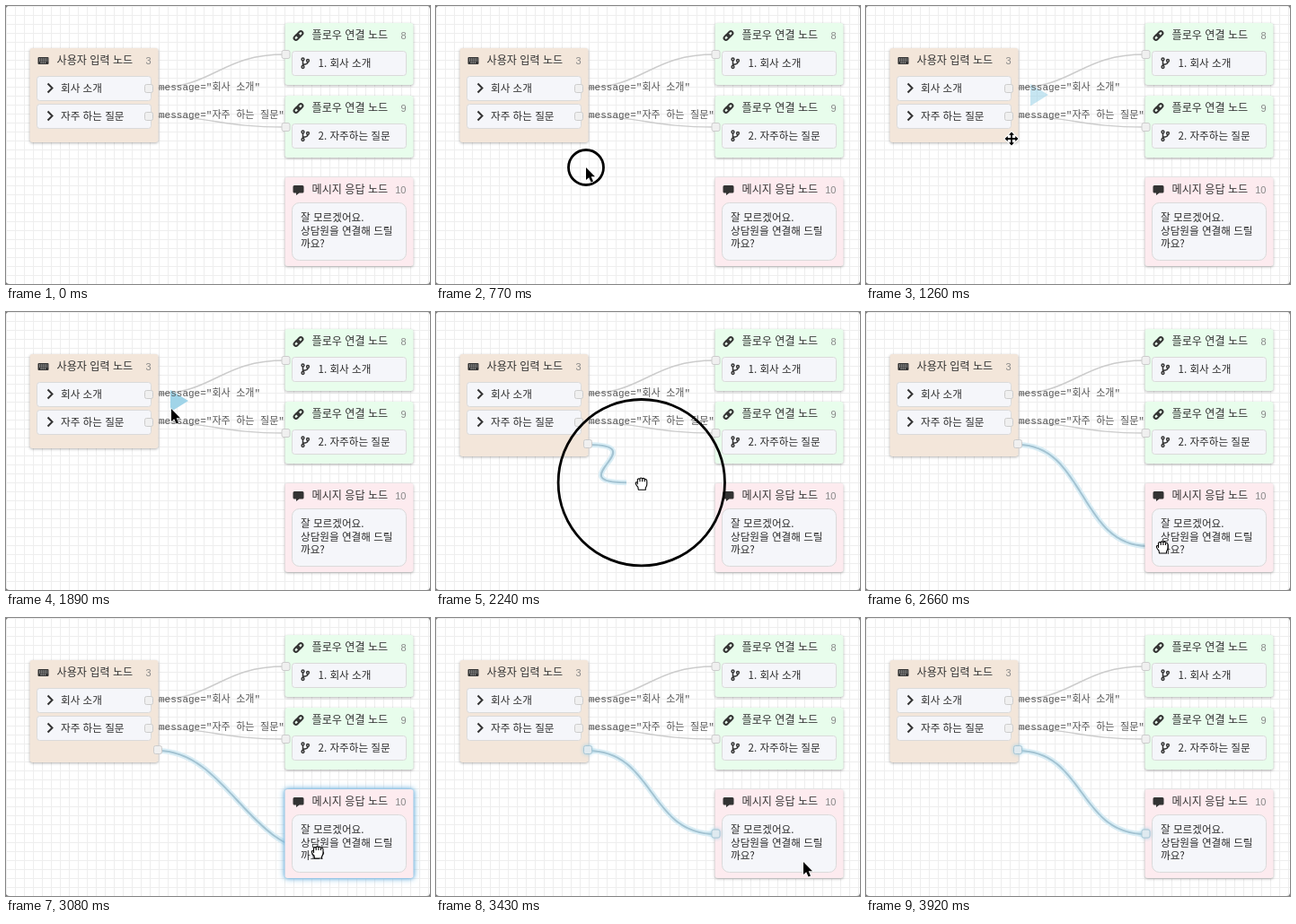
Recreate the animation shown at these times as an HTML page. Size 472 px wide and 310 px high, loop 5320 ms.

```html
<!DOCTYPE html>
<html lang="ko">
<head>
<meta charset="utf-8">
<style>
  html, body { margin: 0; width: 100%; height: 100%; overflow: hidden; background: #777; }
  svg { display: block; width: 472px; height: 310px; }
  text { font-family: "Noto Sans CJK KR", "Noto Sans CJK", sans-serif; font-size: 11.6px; fill: #2b2b2b; }
  .title { font-size: 12.1px; fill: #333; }
  .count { font: 11px "Liberation Sans", sans-serif; fill: #888; text-anchor: end; }
  .label { font: 11px "Liberation Mono", "Noto Sans CJK KR", "Noto Sans CJK", monospace; fill: #555; }
  .node { filter: drop-shadow(0 1px 1.5px rgba(0, 0, 0, .3)); }
  .node.over { filter: drop-shadow(0 0 2px #6db0dc) drop-shadow(0 0 3px #8cc4e6); }
  .item { fill: #f5f6fa; stroke: #dadada; }
  .wire { fill: none; stroke: #ccc; stroke-width: 1.5; }
  .halo { stroke: #d9edf5; stroke-width: 6; }
  .live { stroke: #a3c3d2; stroke-width: 2; }
  .port { fill: #f0f0f0; stroke: #ccc; }
  .port.lit { fill: #dfeaf0; stroke: #a9c6d4; filter: drop-shadow(0 0 2px #9fd0e6); }
  .line { fill: none; stroke: #333; stroke-width: 2; }
</style>
</head>
<body>
<svg viewBox="0 0 472 310">
  <defs>
    <pattern id="grid" width="10" height="10" patternUnits="userSpaceOnUse">
      <path d="M.5 0V10M0 .5H10" stroke="#eee"/>
    </pattern>
    <g id="keyboard">
      <rect x="-6" y="-4" width="12" height="8" rx="1" fill="#333"/>
      <path d="M-4.5-2H5M-4.5 0H5M-3 2.2H3" stroke="#ddd" stroke-dasharray="1.2 1"/>
    </g>
    <g id="link" class="line" transform="rotate(-45)">
      <rect x="-6" y="-2.2" width="7" height="4.4" rx="2.2"/>
      <rect x="-1" y="-2.2" width="7" height="4.4" rx="2.2"/>
    </g>
    <path id="comment" d="M-4.5-5H4.5Q6-5 6-3.5V2Q6 3.5 4.5 3.5H1L-2.5 6V3.5H-4.5Q-6 3.5-6 2V-3.5Q-6-5-4.5-5Z" fill="#333"/>
    <path id="chevron" class="line" d="M-2.5-5L2.5 0L-2.5 5"/>
    <g id="branch" class="line" style="stroke-width:1.5">
      <circle cx="-2.5" cy="-4" r="1.4"/><circle cx="3" cy="-2.5" r="1.4"/><circle cx="-2.5" cy="4.5" r="1.4"/>
      <path d="M-2.5-2.5V3M3-1Q3 1.5-2.5 1.8"/>
    </g>
    <path id="arrow" d="M0 0V14L3.2 11.2L5.6 16.5L8 15.4L5.7 10.3H10Z" stroke="#fff" stroke-width="1.2" paint-order="stroke"/>
    <path id="move" d="M0-7.5L3-4.2H1V-1H4.2V-3L7.5 0L4.2 3V1H1V4.2H3L0 7.5L-3 4.2H-1V1H-4.2V3L-7.5 0L-4.2-3V-1H-1V-4.2H-3Z"
      stroke="#fff" stroke-width="2" paint-order="stroke"/>
    <g id="hand" fill="#fff" stroke="#000" stroke-width="1.1" stroke-linejoin="round">
      <path d="M-3.5 8L-4 5Q-7 2-6.5 0Q-6-1-4.5 0V-3Q-4-5-2-4Q-1-6 .8-4.5Q2.5-5.5 3.5-3.8Q6-4 6 -1.5V2Q6 4 4.5 6V8Z"/>
      <path d="M-4.5 0V2M-1.8-4V-1M.9-4.5V-1M3.5-3.8V-1"/>
    </g>
  </defs>
  <rect width="472" height="310" rx="4" fill="#fff"/>
  <rect width="472" height="310" rx="4" fill="url(#grid)"/>
  <g id="wires"></g>
  <g id="nodes"></g>
  <path id="triangle" d="M183 87L203 99L183 111.5Z" fill="#a0d4e8"/>
  <text class="label" x="170" y="94">message="회사 소개"</text>
  <text class="label" x="170" y="125">message="자주 하는 질문"</text>
  <g id="ports"></g>
  <circle id="ring" fill="none" stroke="#000" stroke-width="2.8"/>
  <use id="cursor"/>
</svg>
<script>
const LOOP = 5320, STEP = 70;
const GRAB = 2030, DROP = 3150;
const $ = id => document.getElementById(id);

const wirePath = (x1, y1, x2, y2) => `M${x1} ${y1}C${x1 + 75} ${y1} ${x2 - 75} ${y2} ${x2} ${y2}`;
const wire = (cls, d = '') => `<path class="wire ${cls}" d="${d}"/>`;
const port = (x, y, id = '') => `<rect id="${id}" class="port" x="${x - 4.5}" y="${y - 4.5}" width="9" height="9" rx="2"/>`;
const icon = (name, x, y) => `<g transform="translate(${x} ${y})"><use href="#${name}"/></g>`;
const item = (x, y, name, label) =>
  `<rect class="item" x="${x + .5}" y="${y + .5}" width="127" height="27" rx="3"/>` +
  icon(name, x + 15, y + 13.5) + `<text x="${x + (name === 'chevron' ? 27 : 29.5)}" y="${y + 17.7}">${label}</text>`;
const node = (id, x, y, height, color, symbol, title, count, body) =>
  `<rect id="${id}" class="node" x="${x}" y="${y}" width="143" height="${height}" rx="3" fill="${color}"/>` +
  icon(symbol, x + 15, y + 14) +
  `<text class="title" x="${x + 30}" y="${y + 18}">${title}</text>` +
  `<text class="count" x="${x + 135}" y="${y + 18}">${count}</text>` + body;

$('wires').innerHTML =
  wire('', wirePath(159, 92, 311, 54)) + wire('', wirePath(159, 123, 311, 135)) + wire('halo') + wire('live');

const reply = ['잘 모르겠어요.', '상담원을 연결해 드릴', '까요?'];
$('nodes').innerHTML =
  node('input', 26.5, 47, 105, '#f3e6da', 'keyboard', '사용자 입력 노드', 3,
    item(34, 78, 'chevron', '회사 소개') + item(34, 109, 'chevron', '자주 하는 질문')) +
  node('flow1', 310.5, 19, 69, '#e8fdec', 'link', '플로우 연결 노드', 8, item(318, 50, 'branch', '1. 회사 소개')) +
  node('flow2', 310.5, 100, 69, '#e8fdec', 'link', '플로우 연결 노드', 9, item(318, 131, 'branch', '2. 자주하는 질문')) +
  node('reply', 310.5, 191, 99, '#fdebef', 'comment', '메시지 응답 노드', 10,
    '<rect class="item" x="318.5" y="219.5" width="127" height="64" rx="8"/>' +
    reply.map((line, i) => `<text x="328" y="${240 + i * 14.7}">${line}</text>`).join(''));

$('ports').innerHTML =
  port(159, 92) + port(159, 123) + port(311.5, 54) + port(311.5, 135) + port(169, 147, 'out') + port(311.5, 240.5, 'in');

const track = [
  [350, 161, 200], [490, 164, 186], [770, 167, 180], [840, 167, 180], [1190, 162, 148], [1470, 162, 148],
  [1890, 184, 108], [2030, 187, 116], [2170, 212, 172], [2520, 296, 263], [2730, 347, 260], [DROP, 347, 260],
  [3570, 440, 278], [3850, 468, 306]
];
function pointer(t) {
  const i = track.findIndex(p => p[0] > t);
  if (i < 0) return track.at(-1).slice(1);
  if (i === 0) return track[0].slice(1);
  const [t0, x0, y0] = track[i - 1], [t1, x1, y1] = track[i];
  const k = (t - t0) / (t1 - t0);
  return [x0 + (x1 - x0) * k, y0 + (y1 - y0) * k];
}

const show = (el, on) => el.setAttribute('visibility', on ? 'visible' : 'hidden');
const between = (t, a, b) => t >= a && t < b;
const liveWires = document.querySelectorAll('.halo, .live');

function ringRadius(t) {
  if (between(t, 350, 840)) return 19.5 + 16 * (770 - t) / STEP;
  if (between(t, 2170, 2660)) return 28.7 + 16 * (2520 - t) / STEP;
  return 0;
}

function draw(t) {
  const [x, y] = pointer(t);
  const grabbed = t >= GRAB, dropped = t >= DROP;

  $('input').setAttribute('height', grabbed ? 114 : 105);
  $('reply').classList.toggle('over', between(t, 2730, DROP));
  show($('out'), grabbed);
  show($('in'), dropped);
  for (const id of ['out', 'in']) $(id).classList.toggle('lit', dropped);

  show($('triangle'), between(t, 1120, GRAB));
  $('triangle').setAttribute('opacity', t < 1190 ? .3 : t < 1470 ? .6 : Math.min(1, .7 + (t - 1470) / 700));

  // The loose end trails the pointer by one step.
  const end = dropped ? [311, 241] : [pointer(t - STEP)[0], y];
  for (const path of liveWires) {
    show(path, grabbed);
    path.setAttribute('d', wirePath(169, 148, ...end));
  }

  const radius = ringRadius(t);
  show($('ring'), radius > 0);
  $('ring').setAttribute('r', radius);
  $('ring').setAttribute('cx', x);
  $('ring').setAttribute('cy', y);

  const overNode = x < 170 && y < 153;
  const shape = grabbed && !dropped ? 'hand' : overNode ? 'move' : 'arrow';
  $('cursor').setAttribute('href', '#' + shape);
  $('cursor').setAttribute('transform', `translate(${x} ${y})`);
  show($('cursor'), between(t, 350, 3920));
}

const start = performance.now();
function tick() {
  const t = (performance.now() - start) % LOOP;
  draw(Math.floor(t / STEP) * STEP);
  requestAnimationFrame(tick);
}
tick();
</script>
</body>
</html>
```
